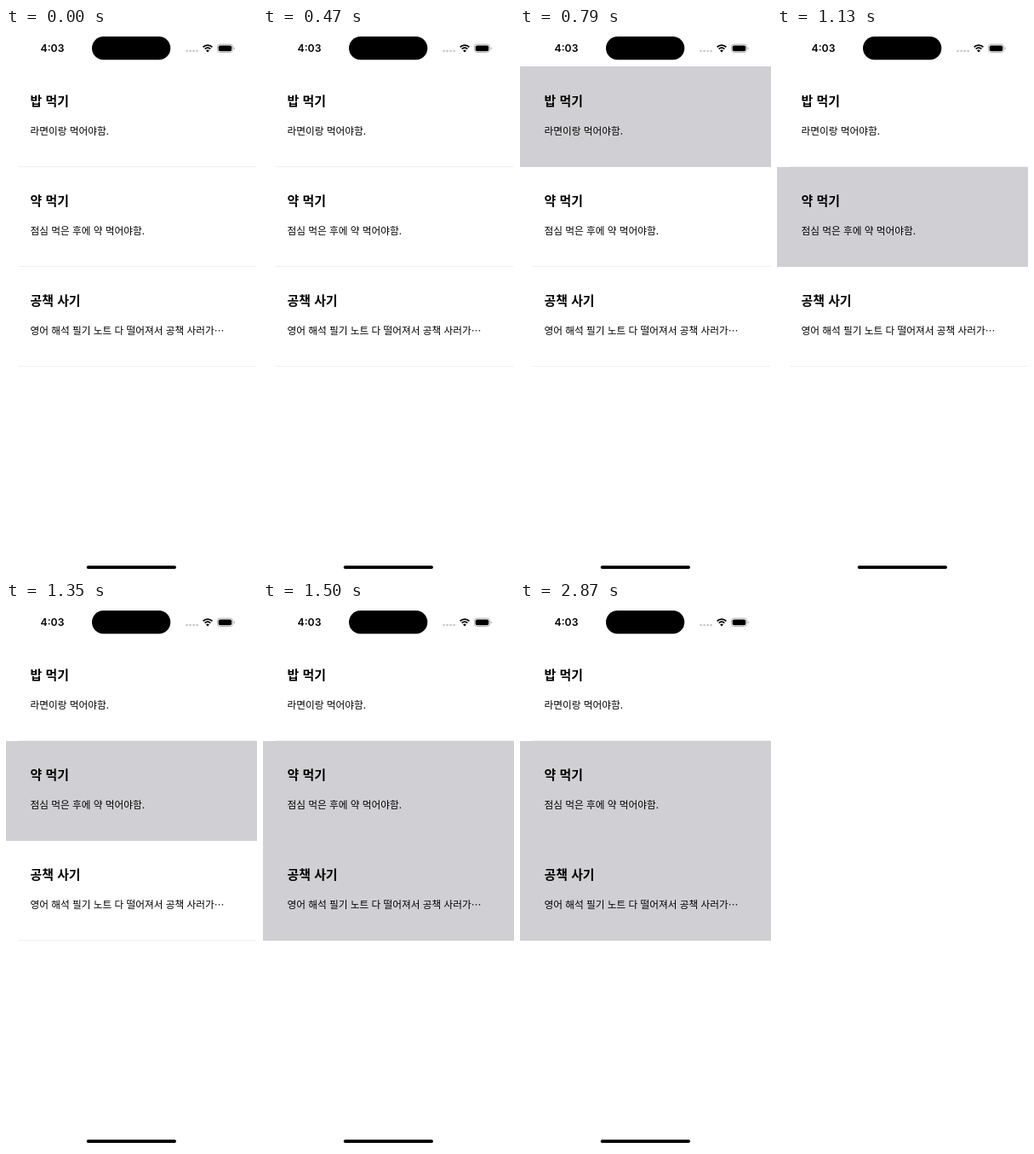
An HTML page for the animation above (3.78 s loop, 295 by 640 pixels).

```html
<!DOCTYPE html>
<html lang="ko">
<head>
<meta charset="utf-8">
<title>메모 목록</title>
<style>
  html, body { margin: 0; width: 100%; height: 100%; overflow: hidden; background: #fff; }
  svg { display: block; width: 295px; height: 640px; }
  text { font-family: "Noto Sans CJK KR", "Noto Sans CJK", sans-serif; fill: #000; }
  .title { font-size: 14.9px; font-weight: 700; }
  .note { font-size: 11.68px; }
  .clock { font-family: Inter, sans-serif; font-size: 12.2px; font-weight: 600; }
  .line { fill: #efeff0; }
  .press { fill: #d0d0d4; opacity: 0; }
</style>
</head>
<body>
<svg viewBox="0 0 295 640">
  <g id="list"></g>
  <text class="clock" x="40.6" y="28.2">4:03</text>
  <rect x="101" y="10" width="92.3" height="27.3" rx="13.6"/>
  <g fill="#c4c4c6">
    <circle cx="212.6" cy="27" r="1.3"/><circle cx="216.6" cy="27" r="1.3"/>
    <circle cx="220.6" cy="27" r="1.3"/><circle cx="224.6" cy="27" r="1.3"/>
  </g>
  <g fill="none" stroke="#000" stroke-width="1.8">
    <path d="M231.6 22.3a7.6 7.6 0 0 1 10.8 0"/>
    <path d="M233.7 24.6a4.7 4.7 0 0 1 6.6 0"/>
  </g>
  <path d="M237 28.4l-1.9-2a2.7 2.7 0 0 1 3.8 0z"/>
  <rect x="248.4" y="19.1" width="18.2" height="9.4" rx="3" fill="none" stroke="#a9a9ab" stroke-width=".9"/>
  <path d="M267.8 22.2v3.2q1.2-.5 1.2-1.6t-1.2-1.6z" fill="#a9a9ab"/>
  <rect x="249.7" y="20.4" width="15.6" height="6.8" rx="1.9"/>
  <rect x="94.7" y="630.2" width="105.3" height="3.8" rx="1.9"/>
</svg>
<script>
const LOOP = 3780, TOP = 45.4, ROW = 117.2;

// on/off: when each row is highlighted, in ms
const rows = [
  { title: "밥 먹기", note: "라면이랑 먹어야함.", on: 790, off: 1130 },
  { title: "약 먹기", note: "점심 먹은 후에 약 먹어야함.", on: 1130, off: LOOP },
  { title: "공책 사기", note: "영어 해석 필기 노트 다 떨어져서 공책 사러가…", on: 1500, off: LOOP }
];

const list = document.getElementById("list");

function add(tag, attrs, text = "") {
  const el = document.createElementNS("http://www.w3.org/2000/svg", tag);
  for (const key in attrs) el.setAttribute(key, attrs[key]);
  el.textContent = text;
  return list.appendChild(el);
}

rows.forEach((row, i) => {
  const top = TOP + i * ROW, y = Math.round(top), end = Math.round(top + ROW);
  add("rect", { class: "line", x: 15, y: end - 1, width: 279, height: 1 });
  row.press = add("rect", { class: "press", x: 0, y, width: 295, height: end - y });
  add("text", { class: "title", x: 28.6, y: top + 45.6 }, row.title);
  add("text", { class: "note", x: 28.6, y: top + 79.4 }, row.note);
});

const start = performance.now();

function draw(now) {
  const t = Math.max(0, now - start) % LOOP;
  for (const { press, on, off } of rows) press.style.opacity = t >= on && t < off ? 1 : 0;
  requestAnimationFrame(draw);
}
draw(start);
</script>
</body>
</html>
```
